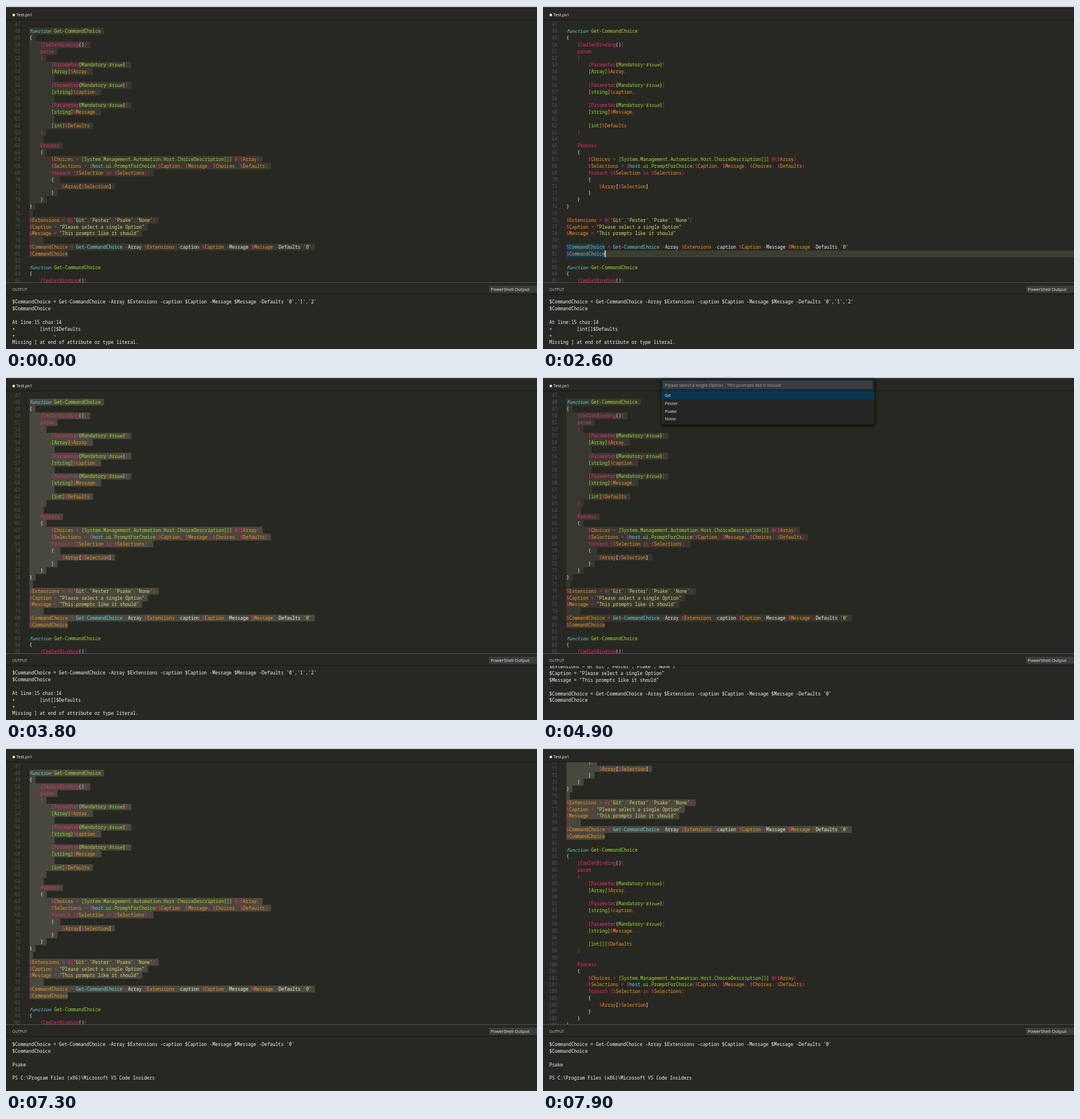
Animation of 930 by 602 pixels, one loop 8 s. Source, as an HTML page with a canvas:

```html
<!DOCTYPE html>
<html lang="en">
<head>
<meta charset="utf-8">
<title>Editor prompt</title>
<style>
  html, body { margin: 0; width: 100%; height: 100%; overflow: hidden; background: #272822; }
  canvas { display: block; width: 930px; height: 602px; }
</style>
</head>
<body>
<canvas id="stage" width="930" height="602"></canvas>
<script>
const ctx = document.getElementById('stage').getContext('2d');
const LOOP = 8000, CHAR = 4.796, ROW = 11.84, LEFT = 41;
const MONO = '500 8px "Noto Sans Mono", "DejaVu Sans Mono", monospace';
const UI = '"Open Sans", "Noto Sans", sans-serif';
const C = {
  bg: '#272822', white: '#f8f8f2', pink: '#f92672', green: '#a6e22e', cyan: '#66d9ef',
  orange: '#fd971f', yellow: '#e6db74', gutter: '#55564f', line: '#3e3d32',
  active: '#49483e', inactive: '#383830', word: '#0b3f5b'
};

// Trailing blanks matter: they widen the selection.
const body = `function Get-CommandChoice
{
    [CmdletBinding()]
    param
    (
        [Parameter(Mandatory=$true)]
        [Array]$Array,
${' '.repeat(8)}
        [Parameter(Mandatory=$true)]
        [string]$caption,
${' '.repeat(8)}
        [Parameter(Mandatory=$true)]
        [string]$Message,
${' '.repeat(8)}
        [int]$Defaults
    )
${' '.repeat(4)}
    Process
    {
        $Choices = [System.Management.Automation.Host.ChoiceDescription[]] @($Array)
        $Selections = $host.ui.PromptForChoice($Caption, $Message, $Choices, $Defaults)
        foreach ($Selection in $Selections)${' '}
        {${' '}
            $Array[$Selection]
        }
    }
}`;
const settings = `$Extensions = @('Git','Pester','Psake','None')
$Caption = "Please select a single Option"
$Message = "This prompts like it should"`;
const call = `$CommandChoice = Get-CommandChoice -Array $Extensions -caption $Caption -Message $Message -Defaults '0'`;

const FIRST = 47;
const code = ['', ...body.split('\n'), '', ...settings.split('\n'), ' '.repeat(4), call,
  '$CommandChoice', '', ...body.replace('[int]', '[int[]]').split('\n')];
const lineText = n => code[n - FIRST];

const logs = {
  error: [call + ",'1','2'", '$CommandChoice', '', 'At line:15 char:14',
    '+' + ' '.repeat(9) + '[int[]$Defaults', '+' + ' '.repeat(14) + '~',
    'Missing ] at end of attribute or type literal.'],
  asking: [...settings.split('\n'), '', call, '$CommandChoice'],
  done: [call, '$CommandChoice', '', 'Psake', '', 'PS C:\\Program Files (x86)\\Microsoft VS Code Insiders']
};

const rules = [
  ['yellow', /"[^"]*"|'[^']*'/],
  ['pink', /\[(?:CmdletBinding|Parameter)/],
  ['green', /\$true/, true],
  ['green', /\[(?:System[\w.]+\[\]|Array|string|int(?:\[\])?)\]/],
  ['pink', /\$/],
  ['cyan', /(?<=\$)host/],
  ['orange', /(?<=\$)\w+/],
  ['green', /\.ui\.PromptForChoice|Mandatory|(?<=function )Get-CommandChoice/],
  ['cyan', /function/, true],
  ['cyan', /Get-CommandChoice/],
  ['white', /\(\)|\((?=Mandatory)|\)(?=\])|\](?<=Selection\])/],
  ['pink', /\b(?:param|foreach|in|Process)\b|-(?=\w)|[=@,\]()]/],
  ['white', /\w+|\S/]
];
const lexer = new RegExp(rules.map(r => `(${r[1].source})`).join('|'), 'g');
const tokens = code.map(text => [...text.matchAll(lexer)].map(m => {
  const [color, , italic] = rules[m.slice(1).findIndex(g => g !== undefined)];
  return { text: m[0], col: m.index, color: C[color], italic };
}));

function rect(color, x, y, w, h) {
  ctx.fillStyle = color;
  ctx.fillRect(x, y, w, h);
}

function write(text, x, y, color, font) {
  ctx.font = font;
  ctx.fillStyle = color;
  ctx.fillText(text, x, y);
}

function clipped(y, h, draw) {
  ctx.save();
  ctx.beginPath();
  ctx.rect(0, y, 930, h);
  ctx.clip();
  draw();
  ctx.restore();
}

// Latest value whose start time has passed.
function at(t, steps) {
  let value;
  for (const [start, v] of steps) if (t >= start) value = v;
  return value;
}

function stateAt(t) {
  return {
    scroll: at(t, [[0, 0], [7500, 70], [7600, 140], [7800, 210], [7900, 280]]),
    // first selected line, 0 when nothing is selected
    head: at(t, [[0, 48], [500, 0], [2700, 79], [2800, 74], [2900, 68], [3000, 61],
      [3100, 54], [3200, 49], [3400, 48]]),
    focus: t >= 500 && t < 4000 || t >= 5900,
    row: at(t, [[0, 0], [500, 70], [2400, 81], [2700, 0]]),
    words: t >= 2600 && t < 2700,
    caret: at(t, [[0, 0], [500, 1], [1000, 0], [1400, 1], [1900, 0], [2300, 1], [3800, 0],
      [5900, 1], [6400, 0], [6800, 1], [7300, 0]]),
    log: at(t, [[0, 'error'], [4500, 'asking'], [6400, 'done']]),
    pick: at(t, [[0, -1], [4000, 0], [5400, 1], [5600, 2], [5900, -1]]),
    inputCaret: t < 4900 || t >= 5400
  };
}

function drawEditor(s) {
  const top = n => 38.3 + (n - 48) * ROW - s.scroll;
  const snap = n => Math.round(top(n));
  const height = n => snap(n + 1) - snap(n);

  if (s.row) rect(C.line, LEFT, snap(s.row), 930 - LEFT, height(s.row));
  if (s.words) for (const n of [80, 81]) rect(C.word, LEFT, snap(n), 14 * CHAR, height(n));
  if (s.head) {
    ctx.fillStyle = s.focus ? C.active : C.inactive;
    for (let n = s.head; n <= 81; n++) {
      const w = lineText(n).length * CHAR + (n < 81 ? 6 : 0);
      ctx.beginPath();
      ctx.roundRect(LEFT, snap(n), w, height(n), [0, 1.5, 1.5, 0]);
      ctx.fill();
    }
  }

  code.forEach((_, i) => {
    const n = FIRST + i, base = top(n) + 8.9;
    if (base < 15 || base > 500) return;
    write(n, 25 - String(n).length * CHAR, base, C.gutter, MONO);
    for (const k of tokens[i])
      write(k.text, LEFT + k.col * CHAR, base, k.color, (k.italic ? 'italic ' : '') + MONO);
  });

  if (s.caret) {
    const n = s.head || s.row;
    const col = s.head ? 0 : lineText(n).length;
    rect(C.white, LEFT + Math.round(col * CHAR), snap(n), 1.5, height(n));
  }
}

function drawFrame() {
  rect('#f0f0f0', 0, 0, 930, 1.6);
  ctx.fillStyle = C.white;
  ctx.beginPath();
  ctx.arc(13.6, 15.8, 2.2, 0, Math.PI * 2);
  ctx.fill();
  write('Test.ps1', 18, 18, '#ffffff', '7.4px ' + UI);
  rect('#1b1c18', 0, 23.5, 930, 1.5);
}

function drawPanel(s) {
  rect(C.bg, 0, 485, 930, 117);
  rect('#51524d', 0, 485, 930, 1);
  write('OUTPUT', 11, 500, '#d0d0cc', '6.6px ' + UI);
  rect('#3c3c3c', 846, 491, 84, 12.5);
  write('PowerShell Output', 849, 500.3, '#f0f0f0', '7.74px ' + UI);
  rect('#1b1c18', 0, 505.5, 930, 1.5);
  const start = { error: 522.4, asking: 511.2, done: 523 }[s.log];
  clipped(507, 95, () => logs[s.log].forEach((text, i) =>
    write(text, 11, start + i * ROW, C.white, MONO)));
}

function drawPicker(s) {
  ctx.save();
  ctx.shadowColor = '#000';
  ctx.shadowBlur = 5;
  ctx.shadowOffsetY = 1;
  rect('#252526', 207, 4, 373.5, 79.5);
  ctx.restore();
  rect('#1d4e68', 210, 6.5, 367, 14.5);
  rect('#3a3c3e', 211, 7.5, 365, 12.5);
  write('Please select a single Option - This prompts like it should', 213.3, 16.8, '#a5a5a5', '7.74px ' + UI);
  if (s.inputCaret) rect('#d8d8d8', 213, 8, 1, 11);
  ['Git', 'Pester', 'Psake', 'None'].forEach((name, i) => {
    const y = 25.5 + i * 13.7;
    if (i === s.pick) rect('#073655', 207, y, 373.5, 13.7);
    write(name, 213.3, y + 9.7, '#f0f0f0', '7.74px ' + UI);
  });
}

function draw(t) {
  const s = stateAt(t);
  rect(C.bg, 0, 0, 930, 602);
  clipped(25, 460, () => drawEditor(s));
  drawFrame();
  drawPanel(s);
  if (s.pick >= 0) drawPicker(s);
}

const begin = performance.now();
function tick() {
  draw((performance.now() - begin) % LOOP);
  requestAnimationFrame(tick);
}
tick();
</script>
</body>
</html>
```
